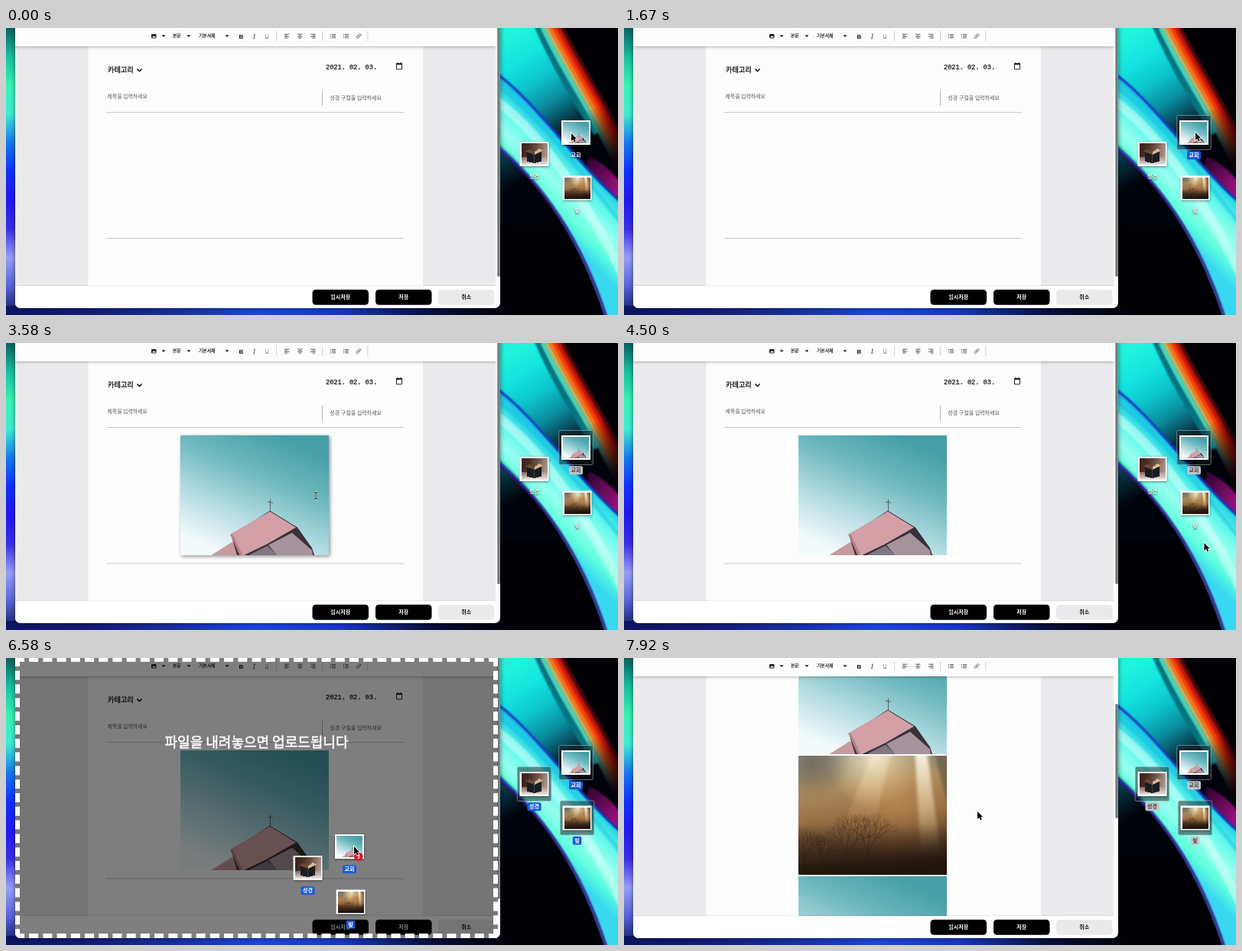
An HTML page with a canvas for the animation above (8000 ms loop, 800 by 376 pixels).

```html
<!DOCTYPE html>
<html lang="ko">
<head>
<meta charset="utf-8">
<title>Drag and drop upload</title>
<style>
html, body { margin: 0; width: 100%; height: 100%; overflow: hidden; background: #000; }
canvas { display: block; width: 800px; height: 376px; }
</style>
</head>
<body>
<canvas id="stage" width="800" height="376"></canvas>
<script>
const W = 800, H = 376, LOOP = 8000;
const KR = '"Noto Sans CJK KR", "Noto Sans CJK JP", "Noto Sans CJK", sans-serif';
const MONO = '"Liberation Mono", monospace';
const stage = document.getElementById('stage').getContext('2d');
let c = stage;

// Drawing helpers
function layer(w, h, paint) {
  const el = document.createElement('canvas');
  el.width = w;
  el.height = h;
  c = el.getContext('2d');
  paint();
  c = stage;
  return el;
}
function rect(x, y, w, h, fill) {
  c.fillStyle = fill;
  c.fillRect(x, y, w, h);
}
function round(x, y, w, h, r, fill) {
  c.beginPath();
  c.roundRect(x, y, w, h, r);
  c.fillStyle = fill;
  c.fill();
}
function poly(fill, ...p) {
  c.beginPath();
  for (let i = 0; i < p.length; i += 2) c.lineTo(p[i], p[i + 1]);
  c.closePath();
  c.fillStyle = fill;
  c.fill();
}
function shape(d, fill) {
  c.fillStyle = fill;
  c.fill(new Path2D(d));
}
function line(d, color, width = 1) {
  c.strokeStyle = color;
  c.lineWidth = width;
  c.stroke(new Path2D(d));
}
// "fat" thickens the strokes for weights between regular and bold
function text(s, x, y, size, color, { weight = 400, align = 'left', font = KR, style = '', fat = 0 } = {}) {
  c.font = `${style} ${weight} ${size}px ${font}`;
  c.textAlign = align;
  c.textBaseline = 'alphabetic';
  c.fillStyle = c.strokeStyle = color;
  c.fillText(s, x, y);
  if (fat) {
    c.lineWidth = fat;
    c.lineJoin = 'round';
    c.strokeText(s, x, y);
  }
}
function grad(x0, y0, x1, y1, ...colors) {
  const g = c.createLinearGradient(x0, y0, x1, y1);
  colors.forEach((k, i) => g.addColorStop(i / (colors.length - 1), k));
  return g;
}
function glow(x, y, r, color, edge) {
  const g = c.createRadialGradient(x, y, 0, x, y, r);
  g.addColorStop(0, color);
  g.addColorStop(1, edge);
  rect(x - r, y - r, 2 * r, 2 * r, g);
}

// Still pictures
const wallpaper = layer(W, H, () => {
  rect(0, 0, W, H, '#010105');
  rect(0, 0, 14, H, grad(0, 0, 0, H, '#0a6060', '#18c0a0', '#38f4b4', '#40ecd4', '#1878f0',
    '#1030fc', '#2018f0', '#3830e8', '#98a0f8', '#5864d8', '#101860'));
  rect(0, 364, 660, 12, grad(0, 0, 660, 0, '#0c1660', '#141c78', '#1830a0', '#1c48d8',
    '#1838c0', '#081040', '#010105'));

  // Upper sheet and its spectral rim
  const rim = 'C736 58 772 112 806 186';
  c.save();
  c.filter = 'blur(1.2px)';
  shape(`M640 -4H706${rim}V260H640Z`,
    grad(662, 10, 752, 152, '#20f4dc', '#14e4e0', '#0cc4cc', '#0a8a9c', '#053040', '#01030a'));
  line('M694 -4C716 48 742 92 772 138', '#067480', 8);
  const bands = ['#4a0a0c', '#c01410', '#ff3408', '#ff7018', '#e0a850', '#50d0b0'];
  bands.forEach((k, i) => {
    c.save();
    c.translate(20 - i * 4.5, i * 1.2);
    line(`M704 -6${rim}`, grad(710, 40, 796, 172, k, k, 'rgba(40,0,10,.3)'), 5.5);
    c.restore();
  });
  shape('M762 168Q788 180 806 206V232Q784 208 758 184Z', grad(758, 176, 800, 210, '#300430', '#98107c'));

  // Broad lower ribbon
  const top = 'M636 56C690 92 740 172 806 230', low = 'C690 192 748 262 786 382';
  shape(`${top}V382H786C748 262 690 192 636 144Z`,
    grad(668, 212, 742, 138, '#38d8f0', '#60ffdc', '#98fff0', '#60f8ec', '#20d0e4', '#1890e0'));
  line('M636 92C700 136 756 222 806 322', 'rgba(215,255,250,.55)', 12);
  line('M636 72C694 110 752 190 806 258', 'rgba(20,190,225,.45)', 5);
  line(top, '#1430c0', 3);
  line(`M636 144${low}`, '#50f8b0', 2.5);
  line(`M633 147${low}`, '#2838e8', 2.5);
  line(`M630 150${low}`, '#401070', 2);
  c.restore();
});

const church = layer(388, 314, () => {
  c.scale(2, 2);
  rect(0, 0, 194, 157, grad(130, 0, 60, 157, '#479ea7', '#6fb9c0', '#b3dce2', '#f4fafb'));
  line('M117.5 84V101M114 87.5L121 88.5', '#56636a', 1.1);
  poly('#c79a9f', 41, 157, 68, 140, 78, 157);
  poly('#3a3038', 66, 131, 117, 99, 153, 121, 172, 148, 175, 157, 74, 157);
  poly('#d2a0a6', 65, 130, 117, 100, 151, 121, 113, 143, 84, 157, 78, 157);
  poly('#b47f86', 65, 130, 69, 131, 81, 157, 77, 157);
  poly('#a5949c', 115, 144, 146, 128, 172, 151, 173, 157, 126, 157);
  poly('#817780', 90, 157, 114, 145, 126, 157);
});

const light = layer(388, 314, () => {
  c.scale(2, 2);
  rect(0, 0, 194, 157, grad(70, 0, 90, 157, '#949080', '#ac8c60', '#987046', '#62432a', '#2a1a13'));
  glow(100, 4, 64, 'rgba(255,248,224,.8)', 'rgba(255,230,170,0)');
  glow(130, 65, 75, 'rgba(206,152,86,.45)', 'rgba(200,140,60,0)');
  glow(18, 12, 50, 'rgba(92,90,78,.6)', 'rgba(92,90,78,0)');
  c.save();
  c.filter = 'blur(4px)';
  poly(grad(0, 0, 0, 130, 'rgba(255,250,230,.9)', 'rgba(255,225,170,0)'), 152, -8, 168, -8, 186, 130, 160, 130);
  poly(grad(0, 0, 0, 100, 'rgba(255,245,215,.4)', 'rgba(255,225,170,0)'), 98, -8, 122, -8, 95, 110, 52, 110);
  poly('rgba(70,68,55,.5)', 176, -8, 200, -8, 200, 80);
  c.restore();
  let seed = 9;
  const rnd = () => (seed = seed * 16807 % 2147483647) / 2147483647;
  function branch(x, y, len, a, n) {
    const x2 = x + Math.cos(a) * len, y2 = y + Math.sin(a) * len;
    line(`M${x} ${y}L${x2} ${y2}`, 'rgba(45,28,17,.55)', .25 + n * .2);
    if (n) for (const k of [-1, 0, 1]) branch(x2, y2, len * (.6 + rnd() * .25), a + k * .5 + rnd() * .3 - .15, n - 1);
  }
  for (const [x, len] of [[6, 21], [30, 18], [60, 27], [88, 29]]) branch(x, 157, len, -1.5, 4);
  rect(0, 90, 194, 67, grad(0, 90, 0, 157, 'rgba(28,17,10,0)', 'rgba(28,17,10,.8)'));
});

const bible = layer(388, 314, () => {
  c.scale(2, 2);
  rect(0, 0, 194, 157, grad(0, 0, 194, 40, '#38201a', '#4c2e26', '#75584c', '#a89488'));
  rect(0, 100, 194, 57, grad(0, 100, 0, 157, 'rgba(190,170,160,.5)', '#ece8e6'));
  poly('#1a1c20', 40, 66, 98, 82, 150, 62, 152, 132, 98, 146, 44, 134);
  poly('#d8b88c', 30, 58, 66, 44, 98, 66, 134, 38, 164, 54, 98, 84);
  poly('#6a4a34', 66, 44, 98, 66, 98, 84, 30, 58);
  line('M98 66V144', '#40444a', 3);
});

// Scene data
const icons = [
  { name: '교회', pic: church, x: 745, y: 137 },
  { name: '성경', pic: bible, x: 690.5, y: 165 },
  { name: '빛', pic: light, x: 746.5, y: 209.5 }
];
const path = [
  [0, 739, 138], [600, 745, 137], [1670, 747, 137], [1720, 747, 137], [2400, 492, 163],
  [2700, 492, 167], [3150, 440, 188], [3580, 405, 200], [3850, 408, 200], [4600, 776, 265],
  [4850, 776, 265], [5400, 663.5, 120], [5560, 663.5, 120], [5880, 751, 137],
  [5980, 751, 137], [6560, 455, 247], [6800, 455, 247], [7250, 462, 201], [8000, 462, 201]
];
const drags = [
  { from: 1720, to: 2500, x: 747, y: 137, items: icons.slice(0, 1) },
  { from: 5960, to: 6720, x: 751, y: 137, items: icons }
];
const SELECT = 1250, BOX_ON = 4850, BOX_OFF = 5580, ADDED = 6850;
const BLUE = '#1b5bd8', GREY = '#c3c3c6';
const clamp = v => Math.max(0, Math.min(1, v));
const ease = v => v * v * (3 - 2 * v);

function pointer(t) {
  const i = Math.max(1, path.findIndex(p => p[0] > t));
  const [a, b] = [path[i - 1], path[i]];
  const k = ease(clamp((t - a[0]) / (b[0] - a[0])));
  return { x: a[1] + (b[1] - a[1]) * k, y: a[2] + (b[2] - a[2]) * k };
}

// Interface parts
function caret(x, y) {
  poly('#222', x - 2.6, y - 1.2, x + 2.6, y - 1.2, x, y + 1.6);
}
function toolbar() {
  c.save();
  c.shadowColor = 'rgba(0,0,0,.3)';
  c.shadowBlur = 4;
  c.shadowOffsetY = 1;
  rect(12, -10, 628, 34, '#fff');
  c.restore();
  rect(12, 0, 634, 24, '#fdfdfe');
  round(190, 8, 6.5, 5.5, 1, '#222');
  poly('#fff', 191, 12.5, 192.8, 10.2, 194, 11.3, 194.7, 10.6, 195.8, 12.5);
  text('본문', 218, 12, 5.8, '#222', { fat: .2 });
  text('기본서체', 252, 12, 5.8, '#222', { fat: .2 });
  [206, 239, 289].forEach(x => caret(x, 10.5));
  const mid = { align: 'center', font: '"Liberation Sans", sans-serif' };
  text('B', 307.5, 13.5, 8, '#111', { ...mid, weight: 700 });
  text('I', 324.3, 13.5, 8, '#666', { ...mid, font: '"Liberation Serif", serif', style: 'italic', fat: .3 });
  text('U', 341, 12.5, 6.5, '#777', mid);
  rect(338.5, 13.3, 5, .7, '#777');
  [353, 413, 472.5].forEach(x => rect(x, 4, .7, 13, '#bbb'));
  [0, .5, 1].forEach((k, i) => {
    for (let r = 0; r < 4; r++) {
      const w = r % 2 ? 4 : 6.5;
      rect(364 + i * 17 + (6.5 - w) * k, 7.7 + r * 1.7, w, .8, '#444');
    }
  });
  [424, 441].forEach(x => {
    for (let r = 0; r < 3; r++) {
      rect(x, 8 + r * 2.2, 1, 1, '#444');
      rect(x + 2, 8 + r * 2.2, 5, .9, '#444');
    }
  });
  c.save();
  c.translate(461, 10.7);
  c.rotate(-.75);
  c.strokeStyle = '#555';
  c.lineWidth = .8;
  for (const x of [-3.6, -.2]) {
    c.beginPath();
    c.roundRect(x, -1.3, 3.8, 2.6, 1.3);
    c.stroke();
  }
  c.restore();
}
function header() {
  text('카테고리', 133, 58.4, 9.2, '#111', { fat: .3 });
  line('M171.5 53.5L174.5 56.7L177.5 53.5', '#111', 1.5);
  text('2021. 02. 03.', 418, 53.6, 8.6, '#111', { font: MONO, fat: .25 });
  c.strokeStyle = '#222';
  c.lineWidth = 1;
  c.strokeRect(510.5, 46.5, 7, 7.5);
  rect(510, 46, 8, 2.2, '#222');
  rect(511.5, 45, 1, 1.5, '#222');
  rect(515.5, 45, 1, 1.5, '#222');
  text('제목을 입력하세요', 132.5, 91.6, 6.9, '#555');
  rect(413, 82, 1, 20, '#b4b4b4');
  text('성경 구절을 입력하세요', 423.3, 94.2, 7, '#555');
  rect(131, 110, 389, 1, '#c8c8c8');
}
function page(t, scroll, hover) {
  c.save();
  c.beginPath();
  c.rect(12, 24, 634, 314);
  c.clip();
  rect(12, 24, 628, 314, '#ebebed');
  rect(107.5, 24, 437.5, 314, '#fdfdfe');
  c.translate(0, -scroll);
  header();
  const pics = t < drags[0].to ? [] : t < ADDED ? [church] : [church, light, church, bible];
  pics.forEach((pic, i) => {
    c.save();
    if (hover) {
      c.shadowColor = 'rgba(0,0,0,.45)';
      c.shadowBlur = 5;
      c.shadowOffsetX = c.shadowOffsetY = 1.5;
    }
    c.drawImage(pic, 228, 121 + i * 158.7, 194, 156.5);
    c.restore();
  });
  rect(131, pics.length ? 288.5 + (pics.length - 1) * 158.7 : 275, 389, 1, '#c8c8c8');
  c.restore();
}
function footer() {
  rect(12, 338, 628, 29, '#fff');
  rect(12, 336.5, 628, 1.5, 'rgba(0,0,0,.06)');
  [['임시저장', 400.5, '#000', '#fff'], ['저장', 483, '#000', '#fff'], ['취소', 565, '#eaeaec', '#111']]
    .forEach(([s, x, bg, fg]) => {
      round(x, 342.7, 73.5, 20, 4.5, bg);
      text(s, x + 36.7, 354.7, 7, fg, { weight: 700, align: 'center' });
    });
}
function scrollbar(t, scroll) {
  const [top, end] = t < drags[0].to ? [-6, 326] : t < ADDED ? [-6, 316] : [-2 + scroll * .408, 148 + scroll * .408];
  round(642.3, top, 3.5, end - top, 1.7, '#77777a');
}
// A dashed side begins and ends with a whole dash
function dashed(x0, y0, x1, y1) {
  const len = Math.hypot(x1 - x0, y1 - y0), n = Math.round((len + 6) / 18);
  c.setLineDash([12, (len - n * 12) / (n - 1)]);
  line(`M${x0} ${y0}L${x1} ${y1}`, '#fff', 6);
}
function dropZone() {
  rect(12, 0, 631, 367, 'rgba(0,0,0,.5)');
  c.save();
  dashed(12, 2, 643, 2);
  dashed(12, 364, 643, 364);
  dashed(15, -1, 15, 367);
  dashed(640, -1, 640, 367);
  c.restore();
  text('파일을 내려놓으면 업로드됩니다', 327.5, 117, 18, '#fff', { align: 'center', fat: .5 });
}
function appWindow(t, scroll, p, drag) {
  c.save();
  c.shadowColor = 'rgba(0,0,0,.5)';
  c.shadowBlur = 6;
  round(12, -20, 634, 387, 7, '#fdfdfe');
  c.restore();
  c.save();
  c.beginPath();
  c.roundRect(12, -20, 634, 387, 7);
  c.clip();
  const hover = t < drags[1].from && !drag && p.x > 228 && p.x < 422 && p.y > 121 && p.y < 277;
  page(t, scroll, hover);
  toolbar();
  footer();
  scrollbar(t, scroll);
  if (drag && p.x < 646) dropZone();
  c.restore();
}
function icon({ name, pic, x, y }, mark, ghost) {
  if (mark && !ghost) {
    round(x - 22.3, y - 22.5, 44.6, 45, 2, 'rgba(20,30,35,.5)');
    c.strokeStyle = 'rgba(190,200,205,.65)';
    c.lineWidth = .8;
    c.stroke();
  }
  c.save();
  c.shadowColor = 'rgba(0,0,0,.5)';
  c.shadowBlur = 3;
  c.shadowOffsetY = 1;
  rect(x - 19, y - 16, 38, 32, '#fff');
  c.restore();
  c.drawImage(pic, x - 17, y - 14, 34, 28);
  const w = name.length * 6.5 + 5;
  if (mark) round(x - w / 2, y + 24.3, w, 11, 2, mark);
  c.save();
  if (!mark) {
    c.shadowColor = 'rgba(0,0,0,.8)';
    c.shadowBlur = 2;
    c.shadowOffsetY = .7;
  }
  text(name, x, y + 32.4, 7, mark === GREY ? '#444' : '#fff', { weight: 700, align: 'center' });
  c.restore();
}
function markOf(it, i, t, p) {
  if (t < SELECT) return null;
  if (t < BOX_ON) return i ? null : t < drags[0].to ? BLUE : GREY;
  if (t < BOX_OFF) return p.x < it.x + 19 && p.y < it.y + 34 ? GREY : null;
  return t >= 5900 && t < drags[1].to ? BLUE : GREY;
}
function marquee(p) {
  rect(p.x, p.y, 776 - p.x, 265 - p.y, 'rgba(200,210,210,.2)');
  c.strokeStyle = 'rgba(225,235,235,.65)';
  c.lineWidth = .8;
  c.strokeRect(p.x, p.y, 776 - p.x, 265 - p.y);
}
function arrow({ x, y }) {
  c.save();
  c.translate(x, y);
  const d = 'M0 0V10L2.4 7.9L4 11.4L5.7 10.6L4.2 7.3H7.2Z';
  line(d, '#fff', 1.6);
  shape(d, '#000');
  c.restore();
}
function beam({ x, y }) {
  const d = `M${x - 2.5} ${y - 5}Q${x} ${y - 5} ${x} ${y - 3}V${y + 3}Q${x} ${y + 5} ${x - 2.5} ${y + 5}`
    + `M${x + 2.5} ${y - 5}Q${x} ${y - 5} ${x} ${y - 3}M${x} ${y + 3}Q${x} ${y + 5} ${x + 2.5} ${y + 5}`;
  line(d, '#fff', 2);
  line(d, '#111', 1);
}

function draw(t) {
  const p = pointer(t);
  const drag = drags.find(d => t >= d.from && t < d.to);
  const scroll = 152 * ease(clamp((t - 7250) / 620));
  c.drawImage(wallpaper, 0, 0);
  icons.forEach((it, i) => icon(it, markOf(it, i, t, p)));
  if (t >= BOX_ON && t < BOX_OFF) marquee(p);
  appWindow(t, scroll, p, drag);
  if (drag) {
    drag.items.forEach(it => icon({ ...it, x: it.x + p.x - drag.x, y: it.y + p.y - drag.y }, BLUE, true));
    if (drag.items.length > 1) {
      round(p.x, p.y + 7.5, 11.5, 11.5, 5.75, '#e01020');
      text('3', p.x + 5.8, p.y + 16, 7.5, '#fff', { weight: 700, align: 'center' });
    }
  }
  const typing = !drag && t > drags[0].to && t < drags[1].from
    && p.x > 131 && p.x < 520 && p.y > 112 && p.y < 289;
  (typing ? beam : arrow)(p);
}

const start = performance.now();
function tick() {
  draw((performance.now() - start) % LOOP);
  requestAnimationFrame(tick);
}
tick();
</script>
</body>
</html>
```
